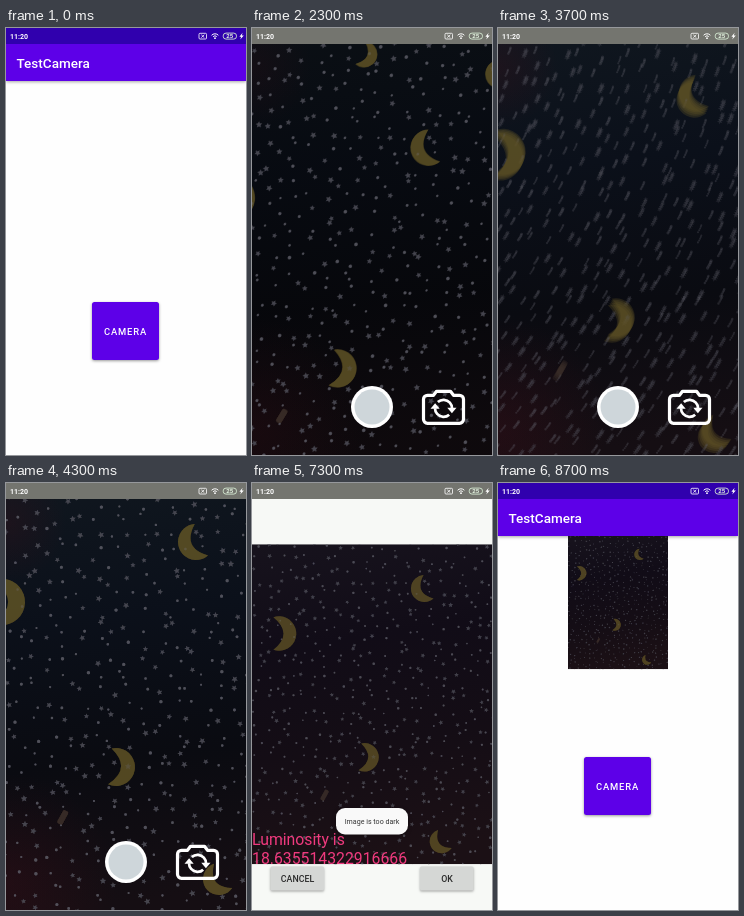
Animation, 240 px wide and 427 px high, one loop 8800 ms. Source, as an HTML page with a canvas:

```html
<!DOCTYPE html>
<html lang="en">
<head>
<meta charset="utf-8">
<title>TestCamera</title>
<style>
html, body { margin: 0; width: 100%; height: 100%; overflow: hidden; background: #fff; }
canvas { display: block; width: 240px; height: 427px; }
</style>
</head>
<body>
<canvas id="stage"></canvas>
<script>
const W = 240, H = 427, LOOP = 8800;
const canvas = document.getElementById('stage');
const ratio = window.devicePixelRatio || 1;
canvas.width = W * ratio;
canvas.height = H * ratio;
const c = canvas.getContext('2d');

const clamp = v => Math.min(1, Math.max(0, v));
const span = (t, from, to) => clamp((t - from) / (to - from));
const ease = p => p * p * (3 - 2 * p);

function rect(x, y, w, h, fill, radius = 0) {
  c.fillStyle = fill;
  c.beginPath();
  c.roundRect(x, y, w, h, radius);
  c.fill();
}

function disc(x, y, r, fill) {
  c.fillStyle = fill;
  c.beginPath();
  c.arc(x, y, r, 0, 7);
  c.fill();
}

function text(str, x, y, size, fill, { weight = 400, align = 'left', spacing = 0 } = {}) {
  c.font = `${weight} ${size}px Roboto, sans-serif`;
  c.textAlign = align;
  c.letterSpacing = spacing + 'px';
  c.fillStyle = fill;
  c.fillText(str, x, y);
}

function withState(draw) {
  c.save();
  draw();
  c.restore();
}

function shadow(blur, dy, alpha) {
  c.shadowColor = `rgba(0,0,0,${alpha})`;
  c.shadowBlur = blur * ratio;
  c.shadowOffsetY = dy * ratio;
}

function ripple(x, y, w, h, p, color) {
  if (p <= 0) return;
  withState(() => {
    c.beginPath();
    c.roundRect(x, y, w, h, 2);
    c.clip();
    disc(x + w / 2, y + h / 2, w * (0.2 + 0.6 * p), color);
  });
}

// ---- Fabric: a scatter of stars and dots, with crescent moons ----
const stars = new Path2D(), dots = new Path2D(), moons = new Path2D();
const CELL = 15.5;
let seed = 11;
const random = () => (seed = seed * 16807 % 2147483647) / 2147483647;

for (let y = -95; y < 460; y += CELL) {
  for (let x = -70; x < 310; x += CELL) {
    const px = x + random() * 13, py = y + random() * 13;
    if (random() < 0.45) {
      const turn = random() * 6, size = 2.6 + random() * 0.8;
      for (let k = 0; k < 10; k++) {
        const r = k % 2 ? size * 0.45 : size, a = turn + k * Math.PI / 5;
        stars[k ? 'lineTo' : 'moveTo'](px + r * Math.cos(a), py + r * Math.sin(a));
      }
      stars.closePath();
    } else {
      const r = 1 + random() * 0.7;
      dots.moveTo(px + r, py);
      dots.arc(px, py, r, 0, 7);
    }
  }
}

// x, y, radius, direction of the bulge
for (const [x, y, r, angle] of [
  [-4, 119, 23, 0], [190, 59, 18, 2.74], [110, 284, 19, 0.1],
  [213, 396, 16, 2.5], [121, -31, 13, 0.35], [257, -18, 14, 2.8]
]) {
  const crescent = new Path2D();
  crescent.arc(0, 0, r, -1.9, 1.9);
  crescent.quadraticCurveTo(r * 0.85, 0, r * Math.cos(1.9), -r * Math.sin(1.9));
  moons.addPath(crescent, new DOMMatrix().translate(x, y).rotate(angle * 180 / Math.PI));
}

function fabric(pose) {
  withState(() => {
    c.translate(120 + pose.x, 213 + pose.y);
    c.rotate(pose.turn);
    c.translate(-120, -213);
    c.globalAlpha = 0.3;
    c.fillStyle = '#50525a';
    c.fill(stars);
    c.fillStyle = '#5c5e66';
    c.fill(dots);
    c.fillStyle = '#615425';
    c.fill(moons);
    c.translate(57, 334);
    c.rotate(0.5);
    rect(-3, -7, 6, 15, '#40332b', 2);
  });
}

function backdrop(colors, x, y, w, h) {
  const g = c.createLinearGradient(x, y, x + w * 0.2, y + h);
  colors.forEach((color, i) => g.addColorStop(i / (colors.length - 1), color));
  rect(x, y, w, h, g);
}

function glow(x, y, r, alpha) {
  const g = c.createRadialGradient(x, y, 0, x, y, r);
  g.addColorStop(0, `rgba(70,15,25,${alpha})`);
  g.addColorStop(1, 'rgba(70,15,25,0)');
  rect(x - r, y - r, 2 * r, 2 * r, g);
}

function handPose(t) {
  const p = span(t, 2800, 4000), rest = 1 - ease(p);
  const drift = 0.006 * Math.max(0, 2800 - t);
  return {
    x: -18 * rest + 10 * Math.sin(Math.PI * p ** 3) - drift,
    y: 54 * rest + drift,
    turn: 0.05 * rest
  };
}

function photo(x, y, w) {
  const h = w * 4 / 3;
  withState(() => {
    c.beginPath();
    c.rect(x, y, w, h);
    c.clip();
    backdrop(['#17131d', '#110c17', '#140d15', '#1b1015'], x, y, w, h);
    c.translate(x + w / 2, y);
    c.scale(w / 320, w / 320);
    c.translate(-120, 0);
    for (let i = 0; i < 4; i++) fabric({ x: 0, y: 0, turn: 0 });
  });
}

// ---- Screens ----
function home(t, hasPhoto) {
  rect(0, 0, W, H, '#fefefe');
  withState(() => {
    shadow(3, 1, 0.35);
    rect(0, 16, W, 37, '#5d00e8');
  });
  rect(0, 0, W, 16, '#3000ae');
  text('TestCamera', 10.5, 40, 13.5, '#fff', { weight: 500 });
  if (hasPhoto) photo(70, 53, 100);
  withState(() => {
    shadow(3, 1, 0.4);
    rect(86, 274, 67, 58, '#5d00e8', 2.5);
  });
  if (!hasPhoto) ripple(86, 274, 67, 58, span(t, 1050, 1350), 'rgba(255,255,255,0.24)');
  text('CAMERA', 98, 306.5, 9.4, '#fff', { weight: 500, spacing: 0.84 });
}

function cameraIcon() {
  c.translate(-0.5, 0.3);
  c.strokeStyle = c.fillStyle = '#fff';
  c.lineWidth = 3.2;
  c.lineJoin = 'round';
  c.beginPath();
  c.moveTo(176, 367);
  c.lineTo(182, 367);
  c.lineTo(185, 363);
  c.lineTo(199, 363);
  c.lineTo(202, 367);
  c.lineTo(208, 367);
  c.arcTo(212, 367, 212, 371, 4);
  c.arcTo(212, 395, 208, 395, 4);
  c.arcTo(172, 395, 172, 391, 4);
  c.arcTo(172, 367, 176, 367, 4);
  c.closePath();
  c.stroke();
  c.lineWidth = 2.7;
  for (const turn of [0, Math.PI]) withState(() => {
    c.translate(192, 380);
    c.rotate(turn);
    c.beginPath();
    c.arc(0, 0, 8.5, -2.3, 0);
    c.stroke();
    c.beginPath();
    c.moveTo(3.8, -0.5);
    c.lineTo(13, -0.5);
    c.lineTo(8.4, 5);
    c.fill();
  });
}

function cameraScreen(t) {
  rect(0, 0, W, H, '#000');
  if (t >= 2150) withState(() => {
    c.globalAlpha = span(t, 2100, 2400);
    backdrop(['#10171f', '#0b101a', '#0a0b11', '#150e13'], 0, 0, W, H);
    glow(0, 40, 60, 0.25);
    glow(0, 400, 110, 0.3);
    const exposure = 130;
    for (let i = 0; i < 5; i++) fabric(handPose(t + exposure * (i / 4 - 0.5)));
  });
  rect(0, 0, W, 16, '#74756f');
  disc(120, 379, 21, '#fff');
  disc(120, 379, 17.5, '#ced6da');
  withState(cameraIcon);
}

function greyButton(label, x, press) {
  withState(() => {
    shadow(2.5, 1, 0.35);
    rect(x, 383.5, 53.5, 24, '#d5d7d5', 1.5);
  });
  ripple(x, 383.5, 53.5, 24, press, 'rgba(0,0,0,0.13)');
  text(label, x + 27, 398.5, 8.8, '#2a2a2a', { weight: 500, align: 'center' });
}

function toast(t) {
  const alpha = span(t, 6000, 6500) * (1 - span(t, 7300, 7750));
  if (!alpha) return;
  withState(() => {
    c.globalAlpha = alpha;
    withState(() => {
      shadow(4, 1, 0.3);
      rect(84, 325, 72, 26.5, '#fafafa', 9);
    });
    text('Image is too dark', 120, 341, 7.1, '#333', { align: 'center' });
  });
}

function resultScreen(t) {
  rect(0, 0, W, H, '#f7f9f6');
  rect(0, 0, W, 16, '#74756f');
  if (t >= 5700) photo(0, 61.3, W);
  text('Luminosity is', 0, 361.5, 15.8, '#f03a7e');
  text('18.635514322916666', 0, 380.5, 15.8, '#f03a7e');
  greyButton('CANCEL', 18.5, 0);
  greyButton('OK', 168, span(t, 7700, 8050));
  toast(t);
}

// The upper screen slides over the lower one, which shifts and darkens.
function slide(lower, upper, q) {
  if (q < 1) withState(() => {
    c.translate(-53 * q, 0);
    lower();
    rect(0, 0, W + 60, H, `rgba(0,0,0,${0.4 * q})`);
  });
  if (q > 0) withState(() => {
    c.translate(W * (1 - q), 0);
    c.beginPath();
    c.rect(0, 0, W, H);
    c.clip();
    upper();
  });
}

function statusIcons() {
  text('11:20', 4, 10.6, 7, '#fff', { weight: 700 });
  c.strokeStyle = '#fff';
  c.lineWidth = 0.8;
  c.beginPath();
  c.roundRect(193, 5.3, 7.5, 5.7, 1);
  c.moveTo(195.3, 6.8);
  c.lineTo(198.3, 9.6);
  c.moveTo(198.3, 6.8);
  c.lineTo(195.3, 9.6);
  c.stroke();
  c.lineWidth = 1;
  for (const r of [2.5, 4.6]) {
    c.beginPath();
    c.arc(209, 10.4, r, -2.4, -0.74);
    c.stroke();
  }
  disc(209, 10.2, 0.9, '#fff');
  c.strokeStyle = '#d5ead2';
  c.lineWidth = 0.9;
  c.beginPath();
  c.roundRect(217.2, 5.1, 13.3, 6, 2.8);
  c.stroke();
  text('25', 223.8, 10.2, 6, '#e2f2df', { weight: 700, align: 'center' });
  c.fillStyle = '#fff';
  c.beginPath();
  c.moveTo(236.6, 4.8);
  c.lineTo(233.4, 8.7);
  c.lineTo(235.2, 8.7);
  c.lineTo(234.2, 11.6);
  c.lineTo(237.8, 7.4);
  c.lineTo(235.8, 7.4);
  c.fill();
}

function render(t) {
  c.setTransform(ratio, 0, 0, ratio, 0, 0);
  const camera = () => cameraScreen(t), result = () => resultScreen(t);
  if (t < 5200) {
    slide(() => home(t, false), camera, ease(span(t, 1370, 1700)));
  } else if (t < 8150) {
    slide(camera, result, ease(span(t, 5200, 5490)));
  } else {
    slide(() => home(t, true), result, 1 - ease(span(t, 8150, 8620)));
  }
  statusIcons();
}

const start = performance.now();
function tick() {
  render((performance.now() - start) % LOOP);
  requestAnimationFrame(tick);
}
tick();
</script>
</body>
</html>
```
